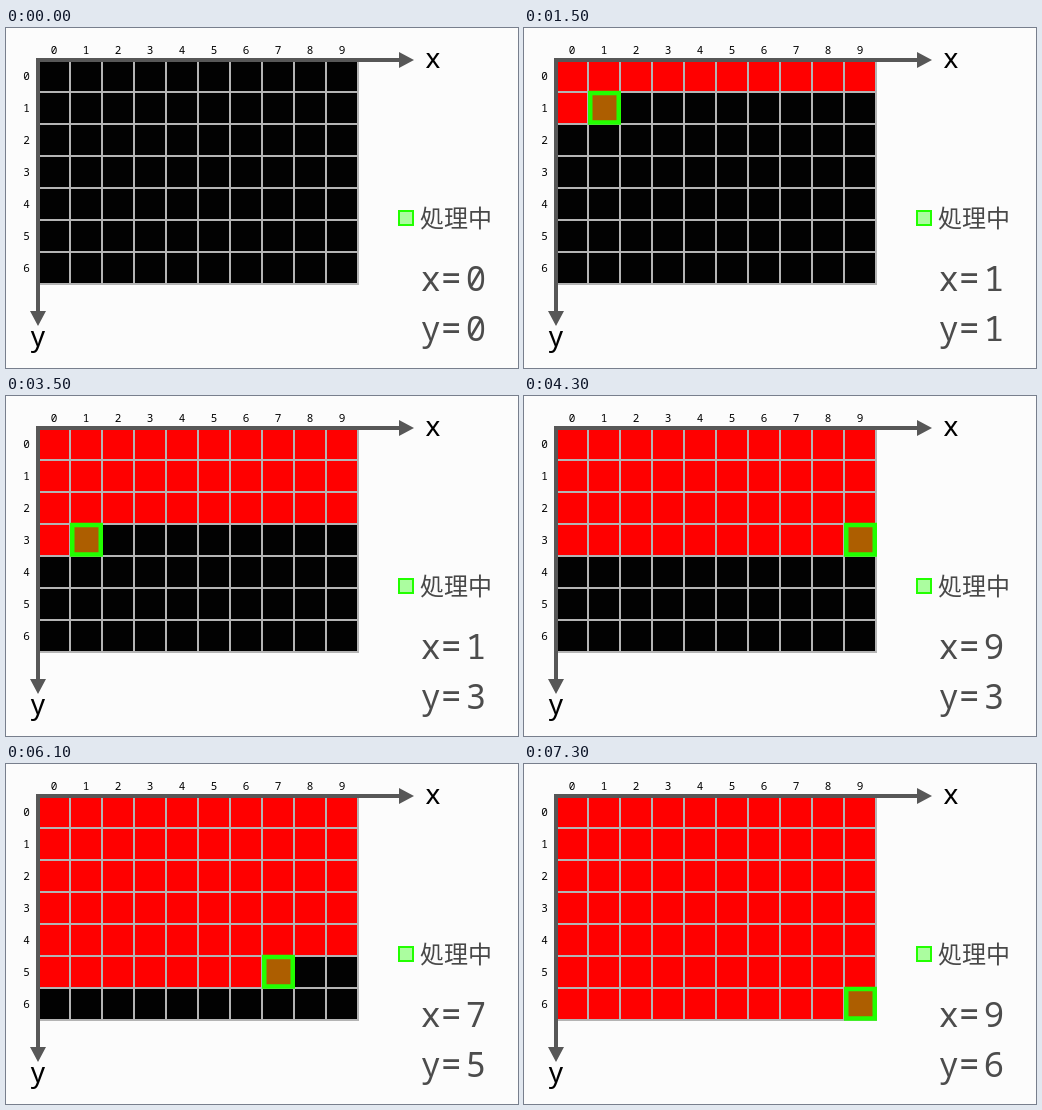
Recreate the animation shown at these times as an HTML page. Size 512 px wide and 340 px high, loop 8000 ms.

```html
<!DOCTYPE html>
<html lang="ja">
<head>
<meta charset="utf-8">
<title>Raster scan</title>
<style>
  html, body { margin: 0; width: 100%; height: 100%; overflow: hidden; background: #fcfcfc; }
  svg { display: block; width: 512px; height: 340px; }
  text { text-anchor: middle; }
  .label { font: 11px "Noto Sans Mono", monospace; }
  .axis { font: 28px "Noto Sans", sans-serif; }
  .legend { font: 500 24px "Noto Sans CJK JP", "Noto Sans CJK", sans-serif; fill: #484848; }
  .value { font: 500 34px "Noto Sans Mono", monospace; fill: #4c4c4c; }
</style>
</head>
<body>
<svg viewBox="0 0 512 340">
  <rect x="32" y="32" width="320" height="224" fill="#020202"/>
  <path id="done" fill="#f00"/>
  <path id="grid" fill="none" stroke="#b4b4b4" stroke-width="2"/>
  <g fill="#575757">
    <path d="M30 30H393V24L408 32L393 40V34H34V283H40L32 298L24 283H30Z"/>
  </g>
  <g id="labels"></g>
  <text class="axis" x="427" y="40">x</text>
  <text class="axis" x="32" y="318">y</text>
  <g fill="#2f0" fill-opacity=".37" stroke="#2f0">
    <rect id="cursor" width="28.5" height="29.5" stroke-width="4.5"/>
    <rect x="393" y="183" width="14" height="14" stroke-width="2"/>
  </g>
  <text class="legend" x="450" y="199">処理中</text>
  <text class="value" x="435" y="263">x=</text>
  <text class="value" x="435" y="313">y=</text>
  <text class="value" id="xValue" x="470" y="263">0</text>
  <text class="value" id="yValue" x="470" y="313">0</text>
</svg>
<script>
  const COLS = 10, ROWS = 7, CELL = 32;
  const LOOP = 8000, STEP = 100, DELAY = 400;
  const get = id => document.getElementById(id);
  const done = get('done'), cursor = get('cursor');
  const xValue = get('xValue'), yValue = get('yValue');

  function addLabel(n, x, y) {
    const text = document.createElementNS('http://www.w3.org/2000/svg', 'text');
    text.setAttribute('class', 'label');
    text.setAttribute('x', x);
    text.setAttribute('y', y);
    text.textContent = n;
    get('labels').append(text);
  }

  let lines = '';
  for (let i = 0; i < COLS; i++) {
    lines += `M${CELL * (i + 2)} 32V257`;
    addLabel(i, CELL * (i + 1.5), 26);
  }
  for (let j = 0; j < ROWS; j++) {
    lines += `M32 ${CELL * (j + 2)}H353`;
    addLabel(j, 20.5, CELL * (j + 1.5) + 4);
  }
  get('grid').setAttribute('d', lines);

  let shown = null;
  function show(index) {
    if (index === shown) return;
    shown = index;
    const active = index >= 0;
    const col = active ? index % COLS : 0;
    const row = active ? Math.floor(index / COLS) : 0;
    const x = CELL * (col + 1), y = CELL * (row + 1);

    cursor.style.display = active ? '' : 'none';
    cursor.setAttribute('x', x + 2.25);
    cursor.setAttribute('y', y + 1);
    done.setAttribute('d', active
      ? `M32 32H352V${y}H${x + CELL}V${y + CELL}H32Z` : '');
    xValue.textContent = col;
    yValue.textContent = row;
  }

  const start = performance.now();
  function frame() {
    const t = (performance.now() - start) % LOOP;
    const index = Math.floor((t - DELAY) / STEP);
    show(Math.max(-1, Math.min(index, COLS * ROWS - 1)));
    requestAnimationFrame(frame);
  }
  frame();
</script>
</body>
</html>
```
